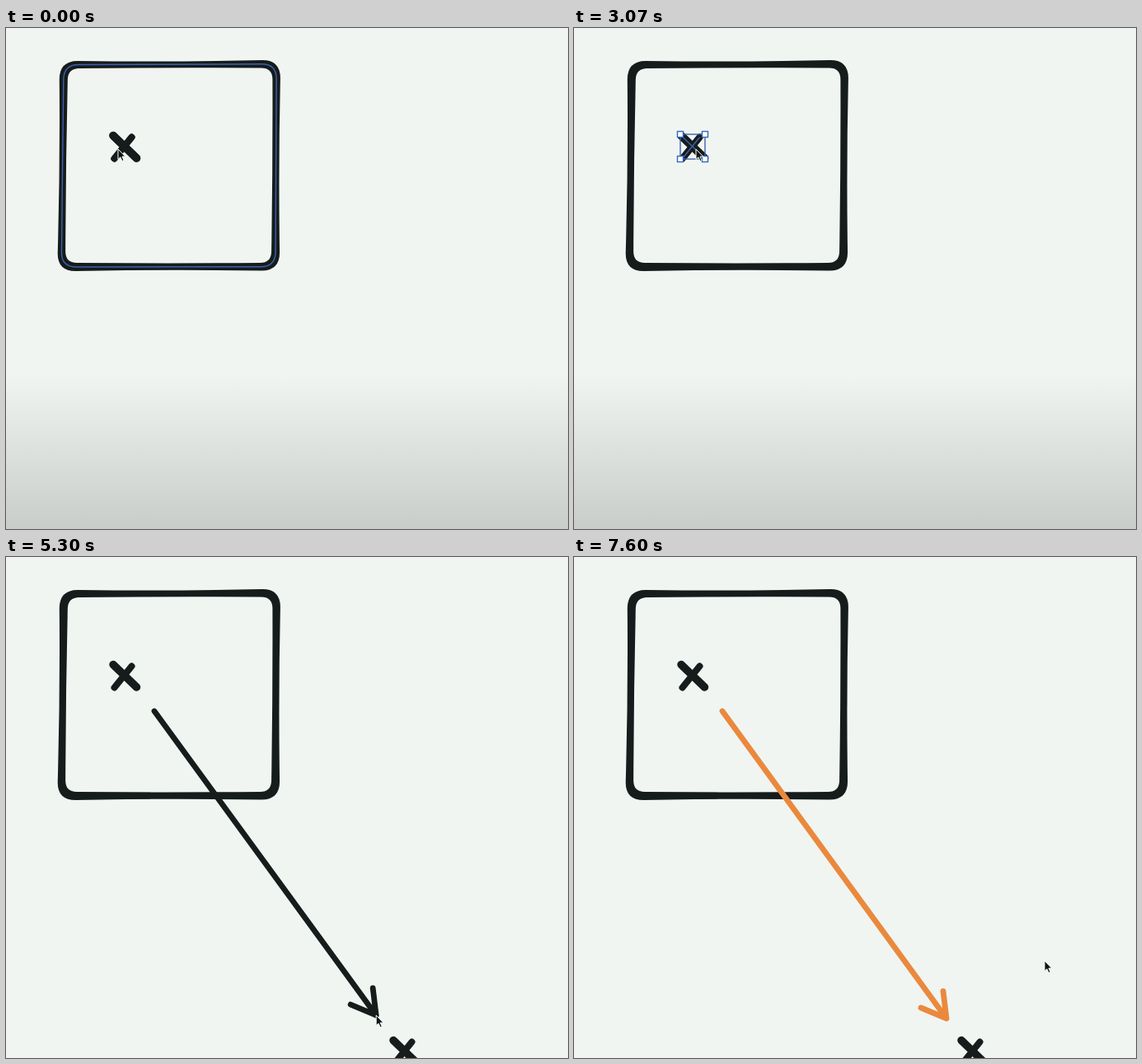
An HTML page that plays this animation: 682 px wide and 608 px high, repeating every 7.63 s.

```html
<!DOCTYPE html>
<html lang="en">
<head>
<meta charset="utf-8">
<title>Drawing an arrow</title>
<style>
html, body { margin: 0; width: 100%; height: 100%; overflow: hidden; background: #f0f5f2; }
svg { display: block; width: 682px; height: 608px; }
.ink { stroke: #161c1b; stroke-linecap: round; stroke-linejoin: round; fill: none; }
.guide { stroke: #3c62b0; stroke-width: 1.4; fill: none; }
.handle { fill: #fff; stroke: #3566b8; stroke-width: 1.4; }
</style>
</head>
<body>
<svg viewBox="0 0 682 608">
  <defs>
    <linearGradient id="fade" x1="0" y1="0" x2="0" y2="1">
      <stop offset="0" stop-color="#c9cdc9" stop-opacity="0"/>
      <stop offset="1" stop-color="#c9cdc9"/>
    </linearGradient>
    <g id="cross">
      <path class="ink" stroke-width="9.5" d="M130 130.5L158.5 158"/>
      <path class="ink" stroke-width="8" d="M152.5 132.5L131.5 158.5"/>
    </g>
  </defs>
  <rect width="682" height="608" fill="#f0f5f2"/>
  <rect id="shade" y="420" width="682" height="188" fill="url(#fade)"/>
  <path id="box" fill="#161c1b" fill-rule="evenodd"/>
  <path id="boxGuide" class="guide"/>
  <use href="#cross"/>
  <g id="copy">
    <use href="#cross"/>
    <path id="copyGuide" class="guide" d="M130 130.5L158.5 158M152.5 132.5L131.5 158.5"/>
    <g id="bounds"><rect class="guide" x="129" y="129" width="30" height="30"/></g>
  </g>
  <g id="arrow">
    <path id="arrowInk" class="ink" stroke-width="6.8"/>
    <g id="arrowSelection">
      <path id="arrowGuide" class="guide" opacity="0.85"/>
    </g>
  </g>
  <path id="cursor" fill="#101414" stroke="#fff" stroke-linejoin="round" d="M0 0V12.5L2.900 9.900L5 14.600L7.100 13.600L5 9.100H8.800Z"/>
</svg>
<script>
const LOOP = 7630;
const START = [180, 187], TIP = [452, 560], DRAG = [340, 456];
const DRAW_AT = 4690, RELEASE_AT = 5340;
const $ = id => document.getElementById(id);
const show = (id, on) => $(id).style.display = on ? '' : 'none';
const within = (t, from, to) => t >= from && t < to;
const lerp = (a, b, k) => a.map((v, i) => v + (b[i] - v) * k);
const progress = (t, from, to) => Math.max(0, Math.min(1, (t - from) / (to - from)));
const ease = (t, from, to) => { const k = progress(t, from, to); return k * k * (3 - 2 * k); };
const move = (id, p) => $(id).setAttribute('transform', `translate(${p})`);

// Rounded quadrilateral; a positive bow pulls the edges towards the centre.
function roundedBox(corners, radius, bow) {
  const centre = lerp(lerp(corners[0], corners[2], 0.5), lerp(corners[1], corners[3], 0.5), 0.5);
  const towards = (a, b, d) => lerp(a, b, d / Math.hypot(b[0] - a[0], b[1] - a[1]));
  const sides = corners.map((c, i) => {
    const next = corners[(i + 1) % 4];
    const bend = towards(lerp(c, next, 0.5), centre, bow);
    return `Q${c} ${towards(c, next, radius)}Q${bend} ${towards(next, c, radius)}`;
  });
  return `M${towards(corners[0], corners[3], radius)}${sides.join('')}Z`;
}

const outer = [[65, 40], [333, 39], [332, 294.5], [62.5, 295]];
const inner = [[75, 49], [323.5, 48.5], [322, 285], [72, 285]];
$('box').setAttribute('d', roundedBox(outer, 22, 2) + roundedBox(inner, 14, -1));
$('boxGuide').setAttribute('d', roundedBox(outer.map((c, i) => lerp(c, inner[i], 0.5)), 18, 0));

for (const x of [129, 159]) for (const y of [129, 159])
  $('bounds').innerHTML += `<rect class="handle" x="${x - 3.5}" y="${y - 3.5}" width="7" height="7"/>`;
for (const k of [0, 0.5, 1]) {
  const [x, y] = lerp(START, TIP, k);
  $('arrowSelection').innerHTML += `<circle class="handle" cx="${x}" cy="${y}" r="3.6"/>`;
}

// The pointer circles the cross, then glides from place to place.
const WANDER = 840;
const glides = [
  [2730, 2900, [148, 147]],
  [3170, 3640, [488, 603]],
  [3720, 3960, [483, 463]],
  [4000, 4520, START],
  [DRAW_AT, RELEASE_AT, TIP],
  [5620, 6650, [571, 490]]
];

function pointer(t) {
  const a = 2 * Math.PI * t / WANDER, c = Math.cos(a), s = Math.sin(a);
  const circling = [139 - 3 * c - 8 * s, 137 + 10 * c - 9 * s];
  return glides.reduce((p, [from, to, goal]) => lerp(p, goal, ease(t, from, to)), circling);
}

function drawArrow(t, [x, y]) {
  const size = Math.min(1, Math.hypot(x - START[0], y - START[1]) / 110);
  const d = `M${START}L${x} ${y}m${-4 * size} ${-33 * size}L${x} ${y}l${-31 * size} ${-13 * size}`;
  $('arrowInk').setAttribute('d', d);
  $('arrowGuide').setAttribute('d', d);
  $('arrowInk').style.stroke = t < 6760 ? '' : '#ea893d';
  show('arrowSelection', within(t, RELEASE_AT + 60, 7300));
}

function render(t) {
  const p = pointer(t);
  move('cursor', p);
  show('cursor', !within(t, 6800, 7240));
  $('shade').style.opacity = 1 - progress(t, 3200, 3450);

  const selected = within(t, 2850, 4180);
  const boxHovered = t < 2850 && t % WANDER < 200;
  show('boxGuide', boxHovered);
  show('copyGuide', selected || t < 2850 && !boxHovered);
  $('copyGuide').style.opacity = selected ? 1 : 0.4;
  show('bounds', selected);
  move('copy', lerp([0, 0], DRAG, ease(t, 3170, 3640)));

  show('arrow', t >= DRAW_AT);
  drawArrow(t, t < RELEASE_AT ? p : TIP);
}

function tick() {
  render(performance.now() % LOOP);
  requestAnimationFrame(tick);
}
tick();
</script>
</body>
</html>
```
